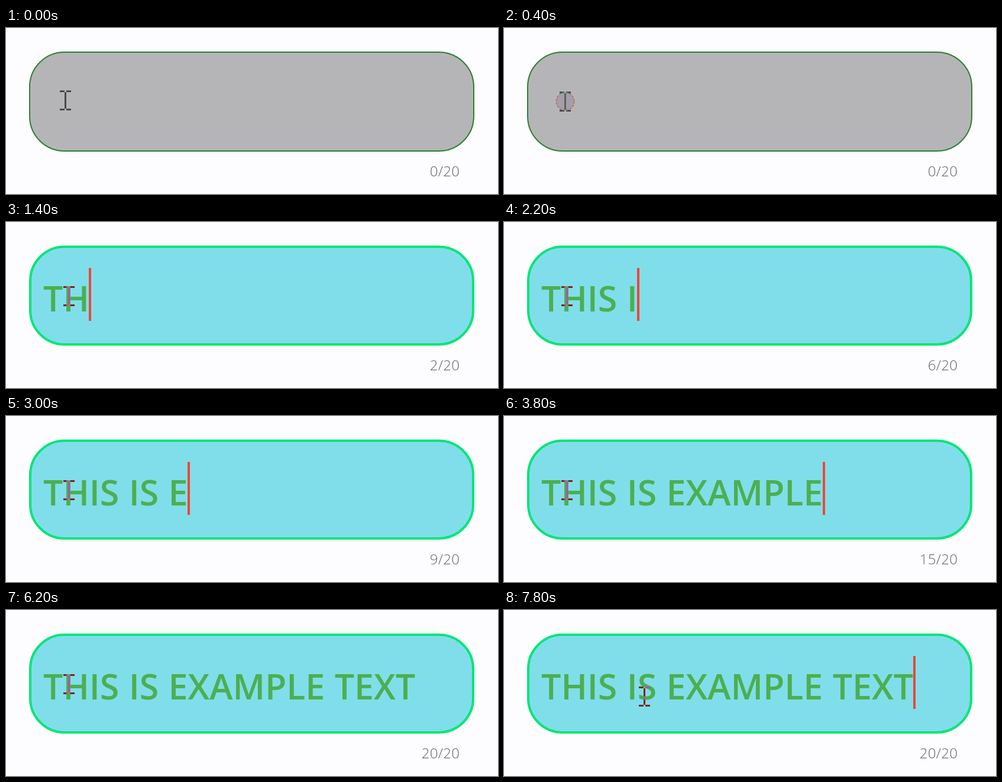
These frames come from a looping animation (832 by 282 pixels, 8 s). An HTML page:

```html
<!DOCTYPE html>
<html lang="en">
<head>
<meta charset="utf-8">
<title>Text field</title>
<style>
  html, body { margin: 0; width: 100%; height: 100%; overflow: hidden; background: #fdfdff; }
  svg { display: block; width: 832px; height: 282px; }
  text { font-family: "Open Sans", "Noto Sans", sans-serif; white-space: pre; }
  #typed { font-size: 59.1px; font-weight: 600; font-kerning: none; word-spacing: 1px; fill: #4caf50; }
  #counter { font-size: 24px; font-weight: 350; letter-spacing: .3px; text-anchor: end; fill: #666; }
  #pointer { fill: #fff; mix-blend-mode: difference; }
</style>
</head>
<body>
<svg viewBox="0 0 832 282">
  <rect width="832" height="282" fill="#fdfdff"/>
  <rect id="field"/>
  <text id="typed" x="63" y="152"></text>
  <rect id="caret" width="4" fill="#f44336"/>
  <text id="counter" x="767.2" y="252"></text>
  <circle id="click" cx="103.5" cy="124.7" r="15.2" fill="#a19fab" stroke="#d0605f" stroke-width="1.6" stroke-dasharray="4 2"/>
  <path id="pointer" d="M0 0h8v3h-8z M11 0h8v3h-8z M8 3h3v28h-3z M0 31h8v3h-8z M11 31h8v3h-8z"/>
</svg>
<script>
const LOOP = 8000, STEP = 200;
const MESSAGE = "THIS IS EXAMPLE TEXT";
const FOCUS = 600, TYPING = 1200, IDLE = 5600;

const el = id => document.getElementById(id);
const set = (id, attrs) => {
  for (const name in attrs) el(id).setAttribute(name, attrs[name]);
};
const show = (id, on) => set(id, { visibility: on ? "visible" : "hidden" });

// Steady progress from 0 to size between two times
const ramp = (t, from, to, size) =>
  Math.min(Math.max(t - from, 0), to - from) * size / (to - from);

// Three bursts of typing with short pauses between them
const typedCount = t => Math.floor(
  ramp(t, 1000, 2600, 8) + ramp(t, 2800, 3800, 7) + ramp(t, 4000, 5000, 5));

function caretVisible(t) {
  if (t >= TYPING && t < IDLE) return true;
  const phase = (t - (t < IDLE ? FOCUS : IDLE + 150)) % 900;
  return phase >= 0 && phase < 400;
}

function drawField(focused) {
  const line = focused ? 4 : 2;
  set("field", {
    x: 39 + line / 2, y: 40 + line / 2,
    width: 753 - line, height: 170 - line, rx: 60 - line / 2,
    fill: focused ? "#80deea" : "#b5b5b7",
    stroke: focused ? "#00e676" : "#2e7d32",
    "stroke-width": line
  });
}

function draw(t) {
  const count = typedCount(t);
  drawField(t >= FOCUS);
  el("typed").textContent = MESSAGE.slice(0, count);
  el("counter").textContent = count + "/" + MESSAGE.length;
  set("caret", {
    x: 63 + (count ? Math.floor(el("typed").getComputedTextLength()) : 0),
    y: count ? 78 : 82,
    height: count ? 90 : 82
  });
  show("caret", caretVisible(t));
  show("click", t >= 400 && t < 800);

  const x = 91 + ramp(t, 200, 600, 6) + ramp(t, 7600, 7800, 131);
  const y = 106 + ramp(t, 200, 600, 3) + ramp(t, 7600, 7800, 21);
  set("pointer", { transform: `translate(${Math.round(x)} ${Math.round(y)})` });
}

const begin = performance.now();
function tick() {
  const t = (performance.now() - begin) % LOOP;
  draw(Math.floor(t / STEP) * STEP);
  requestAnimationFrame(tick);
}
tick();
</script>
</body>
</html>
```
